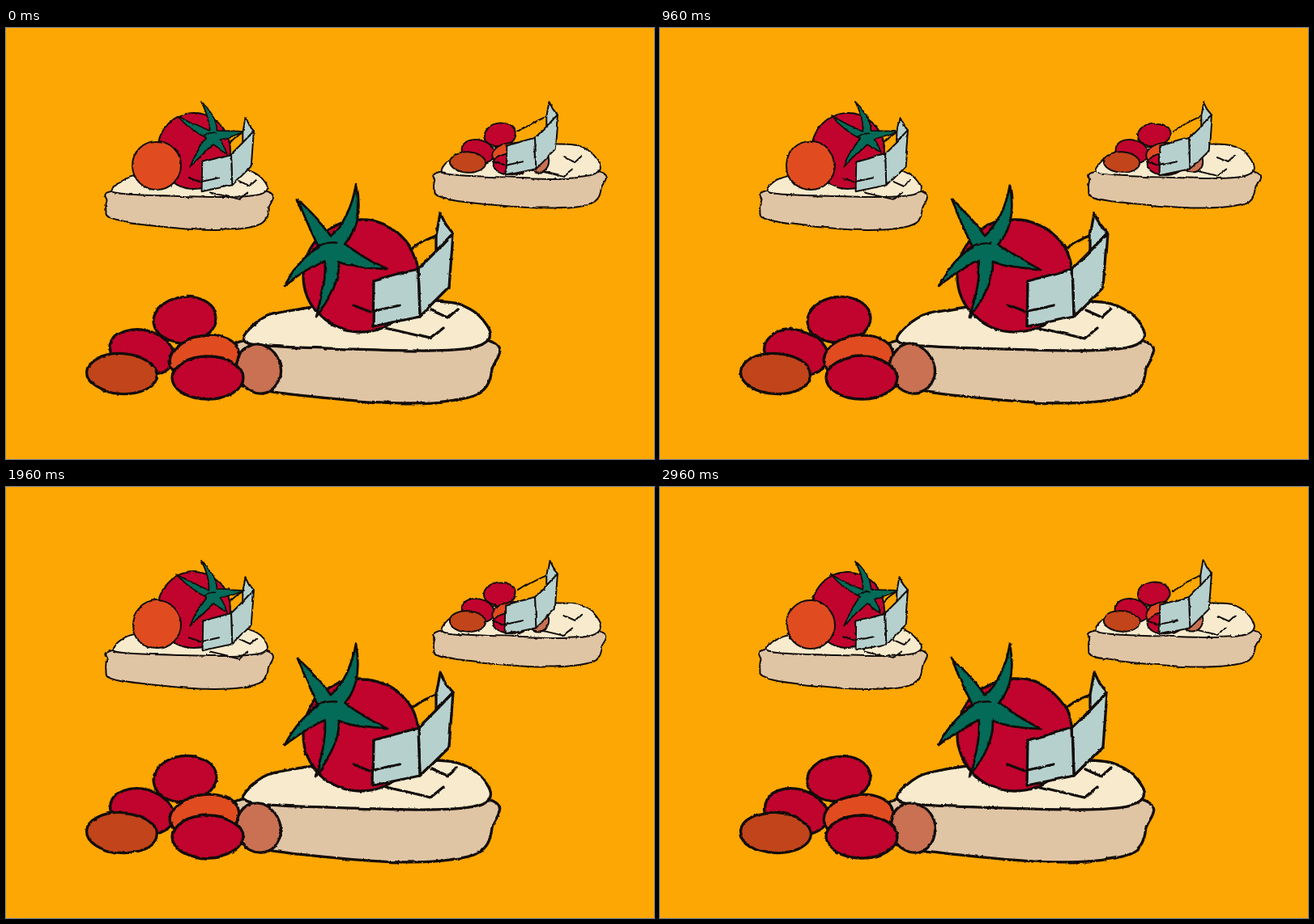
An HTML page that plays this animation: 800 by 533 pixels, repeating every 3 s.

```html
<!DOCTYPE html>
<html lang="en">
<head>
<meta charset="utf-8">
<title>Tomato toasts</title>
<style>
  html, body { margin: 0; width: 100%; height: 100%; overflow: hidden; background: #fda704; }
  svg { display: block; width: 100%; height: 100%; }
  #art { stroke: #120c0a; stroke-linejoin: round; stroke-linecap: round; }
</style>
</head>
<body>
<svg viewBox="0 0 800 533">
  <filter id="boil" filterUnits="userSpaceOnUse" x="0" y="0" width="800" height="533" color-interpolation-filters="sRGB">
    <feTurbulence id="slow" type="fractalNoise" baseFrequency=".035" numOctaves="1" result="a"/>
    <feTurbulence id="fine" type="fractalNoise" baseFrequency=".3" numOctaves="1" result="b"/>
    <feDisplacementMap in="SourceGraphic" in2="a" scale="3.6" xChannelSelector="R" yChannelSelector="G" result="c"/>
    <feDisplacementMap in="c" in2="b" scale="2.6" xChannelSelector="R" yChannelSelector="G"/>
  </filter>
  <g id="art" filter="url(#boil)"></g>
</svg>
<script>
const art = document.getElementById('art');
const RED = '#c0042d', ORANGE = '#e04c20', RUST = '#c2441a', BLUSH = '#c97152',
      GREEN = '#046b58', CREAM = '#f8ebcd', CRUST = '#e0c5a5', PAPER = '#b6d1cd';
let pen = 3;

function path(d, fill = 'none', width = pen) {
  const p = document.createElementNS('http://www.w3.org/2000/svg', 'path');
  p.setAttribute('d', d);
  p.setAttribute('fill', fill);
  p.setAttribute('stroke-width', width);
  art.append(p);
}

// Turns flat x, y values into points, moved and scaled
const place = (x, y, sx, sy = sx) => (...v) =>
  v.flatMap((n, i) => i % 2 ? [] : [[x + n * sx, y + v[i + 1] * sy]]);

const line = pts => path('M' + pts.join('L'));
const panel = pts => path('M' + pts.join('L') + 'Z', PAPER);

// Closed smooth curve
function blob(fill, pts) {
  const at = i => pts[(i + pts.length) % pts.length];
  let d = 'M' + pts[0];
  pts.forEach((b, i) => {
    const a = at(i - 1), c = at(i + 1), e = at(i + 2);
    const p = b.map((n, k) => n + (c[k] - a[k]) / 6);
    const q = c.map((n, k) => n - (e[k] - b[k]) / 6);
    d += `C${p} ${q} ${c}`;
  });
  path(d + 'Z', fill);
}

function oval(fill, x, y, rx, ry = rx, tilt = 0) {
  const a = tilt * Math.PI / 180, dx = rx * Math.cos(a), dy = rx * Math.sin(a);
  const arc = `A${rx} ${ry} ${tilt} 1 1 `;
  path(`M${x - dx} ${y - dy}${arc}${x + dx} ${y + dy}${arc}${x - dx} ${y - dy}Z`, fill);
}

// Slice of bread: x, y, w, h box the cream face, depth is the crust
function bread(x, y, w, h, depth) {
  const side = place(x, y + .8 * h, w, depth), face = place(x, y, w, h);
  blob(CRUST, side(0,0, -.04,.25, -.045,.52, -.03,.68, .08,.8, .33,.92, .6,1, .83,.97, .97,.82, 1.01,.45, 1,0, .5,-.2));
  blob(CREAM, face(0,.8, .06,.42, .17,.22, .46,.04, .8,.02, .92,.17, .99,.5, 1,.77, .93,.94, .75,1, .45,.97, .12,.91));
}

function crumbs(x, y, s) {
  const at = place(x, y, s);
  line(at(-40,73, 15,86, 31,73));
  line(at(16,51, 36,60, 48,49));
}

// Folded paper; x, y is the top of the fold, the strap starts at sx, sy
function mask(x, y, s, sx, sy) {
  const at = place(x, y, s);
  const [from, mid, to] = at(sx, sy, sx / 2 + 8, sy / 2 - 22, 22, -41);
  path(`M${from}Q${mid} ${to}`);
  line(at(-80,45, -59,53));
  panel(at(27,-69, 34,-55, 43,-44, 22,-22, 22,-41));
  panel(at(0,0, 22,-22, 43,-44, 38,23, 2,59));
  panel(at(-55,15, 0,0, 2,59, -56,71));
  line(at(-55,52, -23,45));
}

// Tomato stem: each leaf is [dx, dy, bend], listed clockwise
function stem(x, y, r, leaves) {
  const angle = ([dx, dy]) => Math.atan2(dy, dx);
  const valley = i => {
    const n = leaves.length, a = angle(leaves[i % n]);
    const gap = (angle(leaves[(i + 1) % n]) - a + 2 * Math.PI) % (2 * Math.PI);
    return [x + r * Math.cos(a + gap / 2), y + r * Math.sin(a + gap / 2)];
  };
  let d = 'M' + valley(leaves.length - 1);
  leaves.forEach(([dx, dy, bend], i) => {
    const len = Math.hypot(dx, dy);
    const ctrl = side => {
      const k = (2 * bend + side * r / 2) / len;
      return [x + dx / 2 - dy * k, y + dy / 2 + dx * k];
    };
    d += `Q${ctrl(-1)} ${x + dx} ${y + dy}Q${ctrl(1)} ${valley(i)}`;
  });
  path(d + 'Z', GREEN, pen * .85);
  path(`M${x - 1.4 * r} ${y}q${.8 * r} ${-.6 * r} ${1.7 * r} ${-.5 * r}`, 'none', pen * .8);
}

function cherries(x, y, s) {
  const one = (fill, dx, dy, rx, ry, tilt) => oval(fill, x + dx * s, y + dy * s, rx * s, ry * s, tilt);
  one(RED, 78, -67, 39, 28, -6);
  one(RED, 25, -26, 40, 28, 14);
  one(RUST, 0, 0, 43.5, 25, 3);
  one(ORANGE, 102, -20, 43, 27, -8);
  one(BLUSH, 169, -6, 27, 31, -20);
  one(RED, 106, 5, 44, 26.5, 0);
}

pen = 2;
bread(132, 173, 190, 36, 48);
crumbs(278, 156, .65);
oval(RED, 232, 152, 45, 47);
oval(ORANGE, 186, 170, 30);
stem(256, 135, 9, [[-45, -27, -2], [-15, -44, 4], [38, -7, 0], [17, 20, 0], [-29, 37, 1]]);
mask(278, 156, .65, -3, -21);

bread(538, 143, 195, 43, 45);
crumbs(679, 127, .65);
cherries(570, 166, .51);
mask(653, 136, .65, -31, -12);

pen = 3.3;
bread(293, 337, 304, 62, 77);
crumbs(509, 298, 1);
oval(RED, 438, 306.5, 71, 69.5);
stem(403, 274, 17, [[-43, -62, 0], [29, -80, 8], [67, 25, 2], [-21, 83, -6], [-59, 45, 4]]);
mask(509, 298, 1, -7, -25);
cherries(143, 427.5, 1);

const STEPS = [0, 80, 200, 280, 400, 480];
const slow = document.getElementById('slow'), fine = document.getElementById('fine');
let shown = -1;

function poseAt(t) {
  if (t < 80) return 0;
  const u = t - 80;
  return Math.floor(u / 600) * 6 + STEPS.filter(s => s <= u % 600).length;
}

function tick() {
  const pose = poseAt(performance.now() % 3000);
  if (pose !== shown) {
    shown = pose;
    slow.setAttribute('seed', 3 + pose * 7);
    fine.setAttribute('seed', 11 + pose * 5);
  }
  requestAnimationFrame(tick);
}
tick();
</script>
</body>
</html>
```
